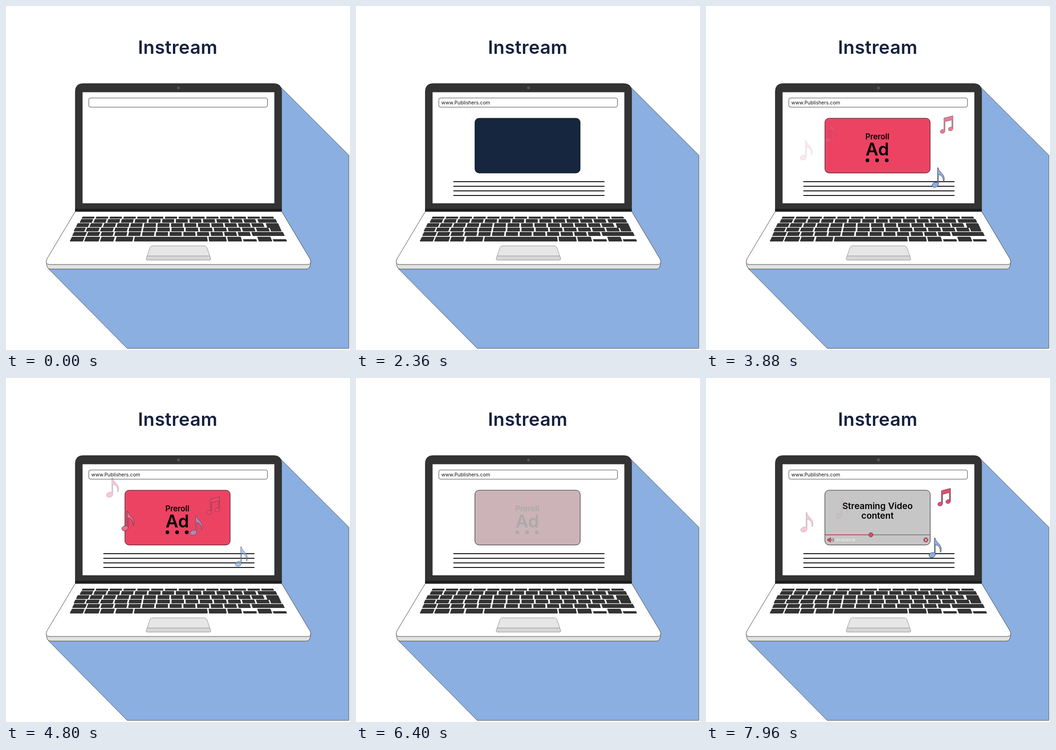
An HTML page that plays this animation: 748x748 px, repeating every 8000 ms.

```html
<!DOCTYPE html>
<html lang="en">
<head>
<meta charset="utf-8">
<title>Instream</title>
<style>
  html, body { margin: 0; width: 100%; height: 100%; overflow: hidden; background: #fff; }
  svg { display: block; width: 100vw; height: 100vh; font-family: Inter, "Open Sans", sans-serif; }
  .bold { font-weight: 600; }
  .edge { stroke: #444; stroke-width: 1; }
</style>
</head>
<body>
<svg viewBox="0 0 748 748">
  <defs>
    <clipPath id="screenClip"><rect x="167" y="188" width="417" height="241"/></clipPath>
    <clipPath id="boxClip"><rect x="258.5" y="244" width="229" height="119.5" rx="9"/></clipPath>
    <g id="single" stroke-width=".9" stroke-linejoin="round">
      <path d="M12.3 .5H14C15 11 29 13 27 28Q26.5 31 25 32Q26 17 14.3 15V37C14 41 9 43.5 5 43C0 42.3-1 37 3 34C6 31.8 9.5 31.6 12.3 33Z"/>
    </g>
    <g id="pair" stroke-width=".9" stroke-linejoin="round">
      <path d="M8.7 5.5L28.3 .5V28.5C28 32 24.5 34 21.5 33.2C17 32 17.5 27 21.5 25.5C23.5 24.7 25 25 26 25.5V9.5L11 13.3V34C10.6 37.5 7 39.3 4 38.6C-.5 37.5 0 32.3 4 30.8C6 30 7.7 30.3 8.7 31Z"/>
    </g>
  </defs>

  <text class="bold" x="373.5" y="104" text-anchor="middle" font-size="40" letter-spacing=".4" fill="#16213e">Instream</text>

  <path d="M595 174L745.7 324.5V744.5H263.5L92 571Z" fill="#8aafe0" stroke="#333" stroke-width=".8"/>
  <path d="M150.5 447V186Q150.5 168.500 168 168.500H582Q599.500 168.500 599.500 186V447Z" fill="#333" stroke="#222" stroke-width=".6"/>
  <rect x="150.500" y="441" width="449" height="6" fill="#1d1d1d"/>
  <circle cx="375" cy="178" r="3" fill="#555"/>
  <rect x="166.500" y="187.500" width="417" height="241.500" fill="#fff"/>

  <path class="edge" d="M87.500 555Q88 572 96 572H654Q662 572 662.700 555Z" fill="#e2e2e2"/>
  <path class="edge" d="M150.500 447H599.500L661 550Q666 562 656 562H94Q84 562 89 550Z" fill="#fff"/>
  <g id="keys" fill="#333" stroke="#333" stroke-width="2" stroke-linejoin="round"></g>
  <path d="M320 521.500H430Q436 521.500 437.500 527L445 549Q446 552.500 442 552.500H308Q304 552.500 305 549L312.500 527Q314 521.500 320 521.500Z" fill="#e6e6e6"/>
  <path d="M307 543.500H443L445 549Q446 552.500 442 552.500H308Q304 552.500 305 549Z" fill="#d6d6d6"/>
  <path d="M320 521.500H430Q436 521.500 437.500 527L445 549Q446 552.500 442 552.500H308Q304 552.500 305 549L312.500 527Q314 521.500 320 521.500ZM307 543.500H443" fill="none" stroke="#888" stroke-width=".9"/>

  <rect x="180" y="200" width="388.500" height="20" rx="4" fill="#fff" stroke="#444"/>
  <text id="url" x="185.500" y="214.300" font-size="10.700" fill="#111"></text>

  <g clip-path="url(#screenClip)">
    <path id="lines" d="M212.500 382H539.500M212.500 392H539.500M212.500 402H539.500M212.500 412H539.500" stroke="#111" stroke-width="2" stroke-linecap="round"/>
    <g id="box">
      <g clip-path="url(#boxClip)">
        <rect x="258" y="243" width="230" height="122" fill="#c6c6c6"/>
        <g id="controls">
          <path d="M259 341H488" stroke="#444"/>
          <path id="played" stroke="#dc3c5c" stroke-width="1.500"/>
          <circle id="knob" cy="341" r="4.700" fill="#ec4363" stroke="#444" stroke-width=".9"/>
          <g id="volume" fill="none" stroke="#7d2f42">
            <path d="M264.500 350H267L271 347V357L267 354H264.500Z" fill="#ec4363"/>
            <path d="M273 349.500Q275 352 273 354.500M275.500 348Q279 352 275.500 356"/>
          </g>
          <text id="clock" x="281" y="355" font-size="7.600" fill="#fff"></text>
          <g id="gear" fill="none">
            <circle cx="478" cy="352" r="4.700" stroke="#7d2f42" stroke-width="1.800" stroke-dasharray="1.850"/>
            <circle cx="478" cy="352" r="3.200" stroke="#c83755" stroke-width="2"/>
          </g>
        </g>
        <g class="bold" font-size="19">
          <text id="word0" x="373" y="306" text-anchor="middle">content</text>
          <text id="word1" x="449.500" y="285" text-anchor="end">Video</text>
          <text id="word2" x="296.500" y="285">Streaming</text>
        </g>
        <g id="play">
          <circle id="disc" r="22" fill="#16263f"/>
          <path id="arrow" d="M-6-10L11 0L-6 10Z" fill="#fff"/>
        </g>
        <g id="ad">
          <rect x="258" y="243" width="230" height="122" fill="#ec4363"/>
          <g id="adText" class="bold" text-anchor="middle">
            <text id="ad2" x="372.500" y="290" font-size="16.700">Preroll</text>
            <text id="ad1" x="372.500" y="325" font-size="38">Ad</text>
            <g id="ad0"><circle cx="351" cy="335.500" r="4"/><circle cx="372" cy="335.500" r="4"/><circle cx="393" cy="335.500" r="4"/></g>
          </g>
        </g>
      </g>
      <rect x="258.500" y="244" width="229" height="119" rx="9" fill="none" stroke="#222"/>
    </g>
  </g>
  <g id="notes"></g>
</svg>
<script>
const NS = 'http://www.w3.org/2000/svg';
const $ = id => document.getElementById(id);
const clamp = v => Math.min(1, Math.max(0, v));
const ramp = (t, a, b) => clamp((t - a) / (b - a));
const out = (t, a, b, power) => 1 - (1 - ramp(t, a, b)) ** power;
const mix = (a, b, p) => a + (b - a) * p;
const shift = (id, x, y) => $(id).setAttribute('transform', `translate(${x} ${y})`);
const fade = (id, v) => $(id).setAttribute('opacity', v);

function add(parent, tag, attrs) {
  const el = document.createElementNS(NS, tag);
  for (const k in attrs) el.setAttribute(k, attrs[k]);
  return parent.appendChild(el);
}

// Keys lean towards the middle of the keyboard as rows recede.
const rowWidth = y => y - 40;
function key(y0, y1, x0, x1) {
  const mid = rowWidth((y0 + y1) / 2);
  const at = (x, y) => `${(375 + (x - 375) * rowWidth(y) / mid).toFixed(1)} ${y}`;
  const [l, r, t, b] = [x0 + 1, x1 - 1, y0 + 1, y1 - 1];
  add($('keys'), 'path', { d: `M${at(l, t)}L${at(r, t)}L${at(r, b)}L${at(l, b)}Z` });
}
function keyRun(y0, y1, x, count, pitch) {
  for (let i = 0; i < count; i++) key(y0, y1, x + i * pitch, x + (i + 1) * pitch - 3.5);
}
keyRun(458, 462.3, 165.5, 14, 30);
keyRun(463.3, 471.3, 162, 13, 29.6);
key(463.3, 471.3, 548, 588);
key(472.3, 480.7, 154, 180);
keyRun(472.3, 480.7, 183, 13, 29.3);
key(482, 490, 149, 172);
keyRun(482, 490, 175, 13, 30.8);
key(491.3, 500, 146, 174);
keyRun(491.3, 500, 177, 12, 29.8);
key(491.3, 500, 535, 604);
for (const [a, b] of [[141, 169], [172, 203], [206, 235], [239, 276], [279, 438], [441, 479], [482, 512], [548, 577]])
  key(501.7, 512, a, b);
key(507, 512, 516, 545);
key(507, 512, 581, 610);
add($('keys'), 'path', { d: 'M566 473.300H591L598 489H577L574 481.500H569Z' });

// Each note: place and opacity as functions of the time within a cycle.
const notes = [
  { shape: 'single', fill: '#ec6f8b', place(t) {
    const p = out(t, 0, 1240, 2);
    return [mix(290, 204, p), mix(287, 292, p), ramp(t, 0, 240) * (1 - ramp(t, 660, 1350))];
  } },
  { shape: 'pair', fill: '#ec4b6d', place(t) {
    const p = out(t, 160, 1440, 2);
    return [mix(413, 511, p), mix(264, 237.5, p), ramp(t, 160, 400) * (1 - ramp(t, 1120, 1600))];
  } },
  { shape: 'single', fill: '#8aafe0', place(t) {
    const p = out(t, 160, 1440, 2), q = ramp(t, 1600, 2600);
    return [mix(371, 494, p) + 7 * q, mix(282, 353, p) + 24 * q, ramp(t, 160, 400) * (1 - ramp(t, 1960, 2640))];
  } },
  { shape: 'single', fill: '#ec6f8b', once: true, place(t) {
    const a = ramp(t, 1080, 1240), b = out(t, 1240, 1760, 1.3), c = ramp(t, 1760, 2600);
    return [282 - 25 * a - 32 * b - 15 * c, 262 - 8 * a - 33 * b - 10 * c,
      (0.08 * ramp(t, 1000, 1080) + 0.14 * a + 0.5 * ramp(t, 1240, 1500)) * (1 - ramp(t, 1760, 2600))];
  } }
];
const cycles = [[2640, 1e5], [4480, 6120], [6880, 1e5]];
const sprites = [];
cycles.forEach(([start, end], i) => notes.forEach(n => {
  if (n.once && i === 1) return;
  const el = add($('notes'), 'use', { href: '#' + n.shape, fill: n.fill, stroke: '#3a3a48' });
  sprites.push({ el, n, start, end });
}));

const URL_TEXT = 'www.Publishers.com';

function draw(t) {
  $('url').textContent = URL_TEXT.slice(0, Math.max(0, Math.floor((t - 80) / 40)));

  shift('box', 0, 186 * (1 - out(t, 1040, 1440, 4)));
  shift('lines', 0, 50 * (1 - out(t, 1200, 1640, 3)));

  const grow = ramp(t, 1960, 2320) ** 2;
  shift('play', 373, 303.5 + 100 * (1 - out(t, 1200, 1800, 3)));
  $('disc').setAttribute('r', 22 + 120 * grow);
  fade('disc', mix(0.55, 1, ramp(t, 1200, 1480)));
  fade('arrow', 1 - ramp(t, 1960, 2120));
  fade('play', t < 2760 ? 1 : 0);

  fade('ad', ramp(t, 2440, 2680) * (1 - ramp(t, 6160, 6440)));
  for (let i = 0; i < 3; i++) {
    const s = 2560 + i * 130, w = 6806 + i * 130;
    shift('ad' + i, 0, -40 * (1 - out(t, s, s + 400, 3)));
    fade('ad' + i, ramp(t, s, s + 100));
    shift('word' + i, 0, -40 * (1 - out(t, w, w + 400, 3)));
    fade('word' + i, ramp(t, w, w + 95));
  }

  const slide = 12 * (1 - out(t, 6700, 7200, 2));
  shift('volume', -slide, 0);
  shift('gear', slide, 0);
  shift('clock', slide / 2, slide);
  fade('clock', ramp(t, 6700, 7160));
  fade('controls', ramp(t, 6560, 6840));
  $('clock').textContent = t < 7500 ? '00:41/03:18' : '00:42/03:18';
  const x = 344.5 + 14 * (t - 7000) / 960;
  $('knob').setAttribute('cx', x);
  $('played').setAttribute('d', `M259 341H${x}`);

  for (const { el, n, start, end } of sprites) {
    const [nx, ny, alpha] = n.place(t - start);
    el.setAttribute('transform', `translate(${nx} ${ny})`);
    el.setAttribute('opacity', alpha * (1 - ramp(t, end, end + 120)));
  }
}

const began = performance.now();
function tick() {
  draw((performance.now() - began) % 8000);
  requestAnimationFrame(tick);
}
tick();
</script>
</body>
</html>
```
